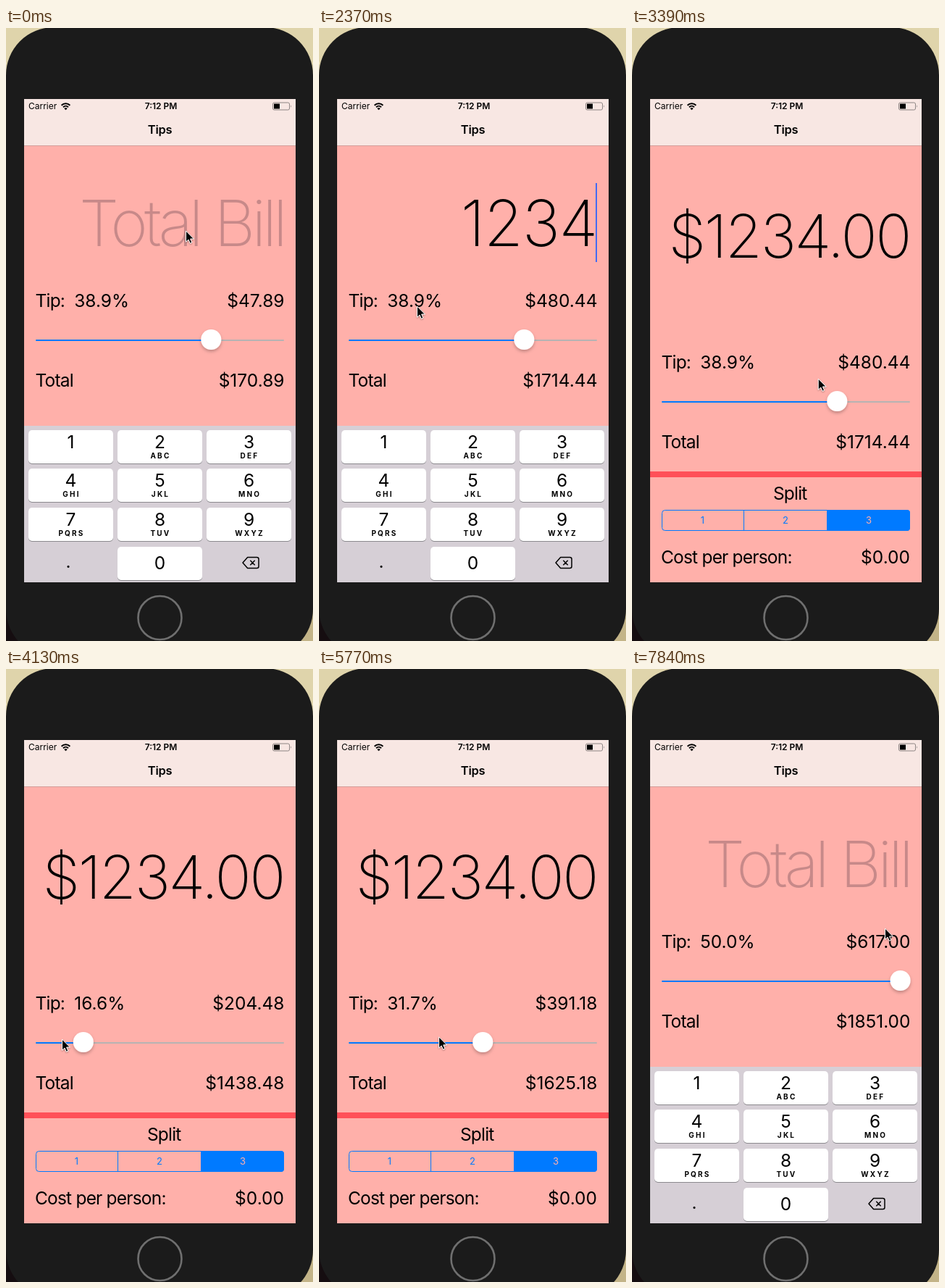
An HTML page for the animation above (7.99 s loop, 424x846 px).

```html
<!DOCTYPE html>
<html lang="en">
<head>
<meta charset="utf-8">
<title>Tip calculator</title>
<style>
html, body { margin: 0; width: 100%; height: 100%; overflow: hidden; background: #1b1b1b; }
svg { display: block; width: 424px; height: 846px; }
text { font-family: Inter, Roboto, "Liberation Sans", sans-serif; font-optical-sizing: none; white-space: pre; }
.label { font-size: 24.5px; letter-spacing: -.8px; }
.num { font-size: 24.5px; }
.end { text-anchor: end; }
.mid { text-anchor: middle; }
.bill { font-weight: 150; text-anchor: end; }
.empty { font-size: 88px; letter-spacing: -4.9px; fill: rgba(0, 0, 25, .22); }
.typing { font-size: 88px; letter-spacing: -1.4px; }
.done { font-size: 83px; letter-spacing: -2.4px; }
.seg { font-size: 13px; text-anchor: middle; fill: #007aff; }
.abc { font-size: 10px; font-weight: 700; letter-spacing: 2.2px; text-anchor: middle; }
</style>
</head>
<body>
<svg viewBox="0 0 424 846" xmlns="http://www.w3.org/2000/svg">
  <defs>
    <clipPath id="screen"><rect x="25" y="98" width="375" height="667"/></clipPath>
    <filter id="soft" x="-50%" y="-50%" width="200%" height="200%">
      <feDropShadow dx="0" dy="2.5" stdDeviation="2.2" flood-opacity=".25"/>
    </filter>
    <filter id="drop" x="-50%" y="-50%" width="200%" height="200%">
      <feDropShadow dx="0" dy="1" stdDeviation=".8" flood-opacity=".35"/>
    </filter>
  </defs>

  <rect width="424" height="846" fill="#dfd4ab"/>
  <rect y="790" width="100" height="56" fill="#150d10"/>
  <rect x="324" y="790" width="100" height="56" fill="#c3b488"/>
  <rect y="-1" width="424" height="869" rx="66" fill="#1b1b1b"/>
  <circle cx="212.5" cy="814" r="30" fill="none" stroke="#6f6f6f" stroke-width="2.6"/>

  <g clip-path="url(#screen)">
    <rect x="25" y="98" width="375" height="667" fill="#ffb0aa"/>
    <rect x="25" y="98" width="375" height="64" fill="#f8e7e3"/>
    <rect x="25" y="162" width="375" height="1" fill="#d39f9b"/>

    <text x="31" y="112" font-size="12">Carrier</text>
    <g fill="none" stroke="#000" stroke-width="2">
      <path d="M76.6 106.7A8.4 8.4 0 0 1 88.4 106.7"/>
      <path d="M79 109.2A5 5 0 0 1 86 109.2"/>
    </g>
    <path d="M82.5 113.2L80.3 111A3.2 3.2 0 0 1 84.7 111Z"/>
    <text class="mid" x="214" y="112" font-size="12" font-weight="600">7:12 PM</text>
    <rect x="368.5" y="103" width="23" height="10" rx="2" fill="none" stroke="#8d8583"/>
    <rect x="370" y="104.5" width="8" height="7"/>
    <path d="M393 106.3Q394.8 108 393 109.7Z" fill="#8d8583"/>
    <text class="mid" x="212.5" y="146" font-size="16.5" font-weight="600" letter-spacing="-.3">Tips</text>

    <text id="bill" x="384"></text>
    <rect id="caret" x="382" y="214" width="2" height="109" fill="#426bf2"/>

    <g id="rows">
      <text class="label" x="40.5" y="385">Tip:</text>
      <text class="num" id="pct" x="94.2" y="385"></text>
      <text class="num end" id="tip" x="384.5" y="385"></text>
      <rect x="41" y="430" width="343" height="2" rx="1" fill="#b6b3b3"/>
      <rect id="fill" x="41" y="430" height="2" rx="1" fill="#007aff"/>
      <circle id="thumb" cy="430" r="14" fill="#fff" filter="url(#soft)"/>
      <text class="label" x="40.5" y="495">Total</text>
      <text class="num end" id="total" x="384.5" y="495"></text>
    </g>

    <rect x="25" y="612" width="375" height="8" fill="#ff5058"/>
    <text class="label mid" x="218.2" y="651">Split</text>
    <rect x="41.5" y="665.5" width="342" height="28" rx="4" fill="none" stroke="#007aff"/>
    <path d="M154.5 665.5V693.5" stroke="#007aff"/>
    <path d="M269 665H380a4 4 0 0 1 4 4V690a4 4 0 0 1 -4 4H269Z" fill="#007aff"/>
    <text class="seg" x="97.5" y="684">1</text>
    <text class="seg" x="212" y="684">2</text>
    <text class="seg" x="327" y="684" style="fill:#ffb0aa">3</text>
    <text class="label" x="40" y="739">Cost per person:</text>
    <text class="num end" x="384" y="739">$0.00</text>

    <g id="pad"><rect x="25" y="549" width="375" height="217" fill="#d6cfd6"/></g>
  </g>

  <path id="arrow" d="M.5 0V15.2L4 12L6.3 17.2L8.8 16.1L6.6 11H11.4Z" stroke="#fff" filter="url(#drop)"/>
</svg>
<script>
const LOOP = 7990, TICK = 147.95, LAST = 53;
const TYPED = 5, DISMISSED = 18, CLEARED = 50;   // ticks
const $ = id => document.getElementById(id);
const set = (id, attrs) => { for (const k in attrs) $(id).setAttribute(k, attrs[k]); };
const money = v => '$' + v.toFixed(2);

function add(tag, attrs, text = '') {
  const el = document.createElementNS('http://www.w3.org/2000/svg', tag);
  for (const k in attrs) el.setAttribute(k, attrs[k]);
  el.textContent = text;
  $('pad').append(el);
}

// Number pad
function key(col, row, digit, sub, base) {
  const x = 31 + col * 123, y = 555 + Math.floor(row * 53.7);
  const box = { x, width: 117, height: 46, rx: 5 };
  add('rect', { ...box, y: y + 1, fill: '#8b898e' });
  add('rect', { ...box, y, fill: '#fff' });
  add('text', { x: x + 58.5, y: y + base, class: 'num mid' }, digit);
  add('text', { x: x + 59.5, y: y + 39, class: 'abc' }, sub);
}
',ABC,DEF,GHI,JKL,MNO,PQRS,TUV,WXYZ'.split(',')
  .forEach((sub, i) => key(i % 3, Math.floor(i / 3), i + 1, sub, 25));
key(1, 3, 0, '', 31);
add('text', { x: 86, y: 745, class: 'num mid' }, '.');
add('path', {
  d: 'M327 738L333.6 730.5H346.5q2.5 0 2.5 2.5V743q0 2.5 -2.5 2.5H333.6ZM337.3 734.8l6.4 6.4m0 -6.4l-6.4 6.4',
  fill: 'none', stroke: '#000', 'stroke-width': 1.5, 'stroke-linejoin': 'round'
});

// Key poses [tick, value...], eased in and out between neighbours
const arrow = [
  [10, 248, 280], [11, 239, 338], [16, 135, 384], [19, 175, 391], [25, 284, 515], [28, 77, 511],
  [29, 60, 511], [34, 380, 515], [37, 48, 512], [42, 387, 500], [43, 387, 500], [46, 241, 305],
  [49, 241, 305], [53, 349, 358]
];
const percent = [[25, 38.9335], [28, 16.5705], [29, 13.2], [34, 49.2504], [37, 13.4], [41, 50]];
const shift = [[18, 0], [21.28, 85], [49.7, 85], [53, 0]];
const padDrop = [[17.4, 0], [19.4, 217], [49.4, 217], [51.4, 0]];
const caret = [[0, 0], [2, 1], [11, 1], [13.5, 0], [16, 1]];

function at(poses, n) {
  const i = poses.findIndex(p => p[0] >= n);
  const b = poses.at(i), a = i > 0 ? poses[i - 1] : b;
  const u = b === a ? 0 : (n - a[0]) / (b[0] - a[0]);
  const f = (1 - Math.cos(Math.PI * u)) / 2;
  return a.slice(1).map((v, j) => v + (b[j + 1] - v) * f);
}

function billAt(n) {
  if (n < TYPED) return ['empty', 'Total Bill', 123];
  if (n >= CLEARED) return ['empty', 'Total Bill', 1234];
  if (n >= DISMISSED) return ['done', money(1234), 1234];
  const text = '1234'.slice(0, n < 9 ? Math.min(n - 4, 3) : 4);
  return ['typing', text, +text];
}

function draw(n) {
  const [state, text, amount] = billAt(n);
  set('bill', { class: 'bill ' + state, y: state === 'done' ? 317 : 301 });
  $('bill').textContent = text;

  const [p] = at(percent, n), tip = amount * p / 100, x = 55 + (p - 10) * 7.89;
  $('pct').textContent = p.toFixed(1) + '%';
  $('tip').textContent = money(tip);
  $('total').textContent = money(amount + tip);
  set('fill', { width: x - 41 });
  set('thumb', { cx: x });

  set('caret', { opacity: n < DISMISSED ? at(caret, n)[0] : 0 });
  set('rows', { transform: `translate(0 ${at(shift, n)})` });
  set('pad', { transform: `translate(0 ${at(padDrop, n)})` });
  set('arrow', { transform: `translate(${at(arrow, n)})` });
}

let shown = -1;
const start = performance.now();
function frame() {
  const t = (performance.now() - start) % LOOP;
  const n = Math.min(LAST, Math.floor((t + 22) / TICK));
  if (n !== shown) draw(shown = n);
  requestAnimationFrame(frame);
}
frame();
</script>
</body>
</html>
```
